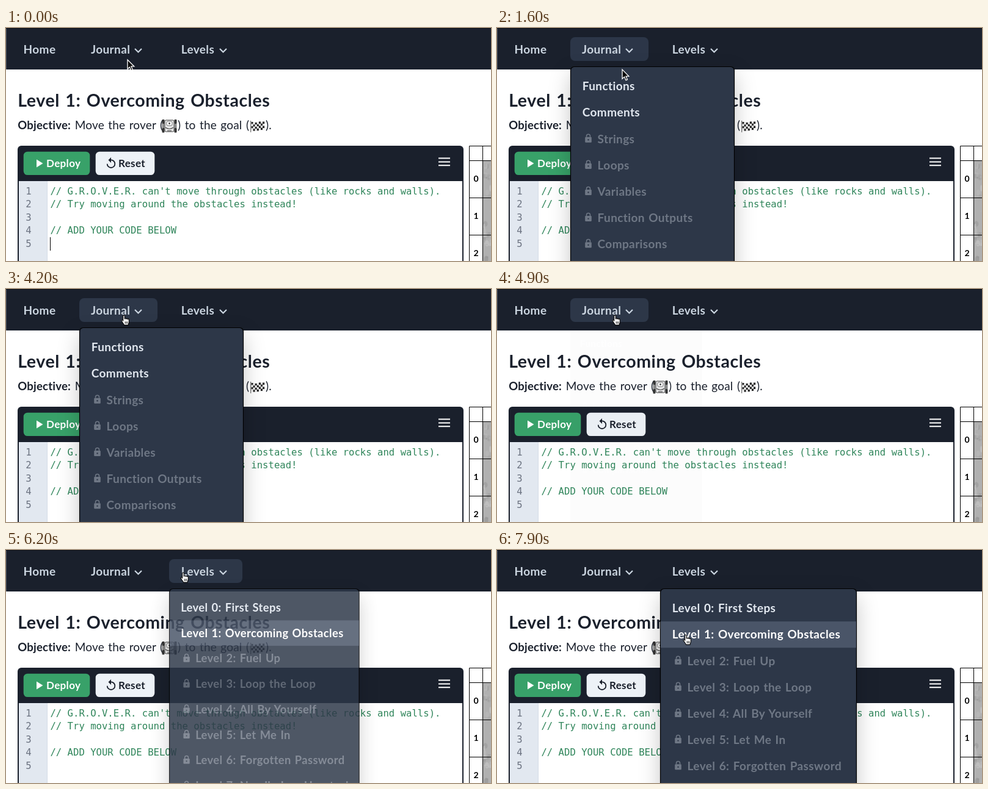
Recreate the animation shown at these times as an HTML page. Size 794x382 px, loop 8 s.

```html
<!DOCTYPE html>
<html lang="en">
<head>
<meta charset="utf-8">
<title>Level menu</title>
<style>
  html, body { margin: 0; width: 100%; height: 100%; overflow: hidden; background: #fff; }
  svg { display: block; width: 794px; height: 382px; }
  text { font-family: Lato, "Open Sans", sans-serif; white-space: pre; }
  .ui { font-size: 19px; font-weight: 700; letter-spacing: .02em; word-spacing: .07em; }
  .title { font-size: 28.5px; }
  .label { font-size: 18.6px; letter-spacing: .01em; }
  .body { font-size: 19px; letter-spacing: .01em; word-spacing: .07em; }
  .btn { font-size: 17px; }
  .code { font: 15.62px "DejaVu Sans Mono", monospace; }
  .axis { font-size: 14px; font-weight: 700; text-anchor: middle; }
  .panel { filter: drop-shadow(0 14px 17px rgba(0,0,0,.22)); }
</style>
</head>
<body>
<svg id="stage" viewBox="0 0 794 382"></svg>
<script>
const LOOP = 8000, INK = '#1a202c', PALE = '#cbd5e0', SLATE = '#2d3748', LIT = '#4a5568';
const TOP = 64, ROW = 43.1, FIRST = 74;

const rect = (x, y, w, h, fill, extra = '') =>
  `<rect x="${x}" y="${y}" width="${w}" height="${h}" fill="${fill}" ${extra}/>`;
const text = (x, y, s, cls, fill = INK) =>
  `<text x="${x}" y="${y}" class="${cls}" fill="${fill}">${s}</text>`;
const line = (d, stroke, width) =>
  `<path d="${d}" fill="none" stroke="${stroke}" stroke-width="${width}"/>`;
const chevron = x => line(`M${x} 34l5.5 5.5 5.5-5.5`, PALE, 2.2);

function seeded(seed) {
  return () => (seed = (seed * 16807) % 2147483647) / 2147483647;
}

function terrain() {
  const rnd = seeded(41);
  let out = rect(781, 218, 13, 164, '#b0b0b0');
  for (let i = 0; i < 34; i++) {
    const shade = Math.round(140 + rnd() * 65);
    out += `<ellipse cx="${781 + rnd() * 13}" cy="${218 + rnd() * 164}" rx="${1 + rnd() * 3}"
      ry="${1 + rnd() * 5}" fill="rgb(${shade},${shade},${shade})" opacity=".5"/>`;
  }
  return `<g clip-path="url(#ground)">${out}</g>`;
}

function rover() {
  let out = '';
  for (const x of [255.5, 275.5]) {
    out += rect(x, 150, 4, 7, '#333', 'rx="1"') + rect(x, 157, 4, 7, '#888') + rect(x, 164, 4, 7.5, '#333', 'rx="1"');
  }
  return out + rect(260, 151, 15, 19, '#e6e6e6', 'rx="2" stroke="#444"') +
    rect(263, 153, 9, 7, '#fff', 'rx="2" stroke="#555" stroke-width=".8"') +
    `<circle cx="267.5" cy="156.5" r="1.4" fill="#444"/>` +
    line('M261 163q6.5 5 13 0M264 168.5h7', '#444', 1.2);
}

function flag() {
  let out = '';
  for (let c = 0; c < 7; c++) for (let r = 0; r < 4; r++) {
    const y = 154 + r * 3.5 + Math.sin(c * .95) * .9;
    out += rect(401.5 + c * 3.1, y, 3.1, 3.5, (c + r) % 2 ? '#eee' : '#222');
  }
  return out + rect(400, 152, 1.3, 19, '#777');
}

function page() {
  const code = [
    "// G.R.O.V.E.R. can't move through obstacles (like rocks and walls).",
    '// Try moving around the obstacles instead!', '', '// ADD YOUR CODE BELOW', ''];
  const lines = code.map((s, i) => {
    const y = 272.5 + i * 21.6;
    return text(32.3, y, i + 1, 'code', '#6b7280') + text(72.4, y, s, 'code', '#2f855a');
  }).join('');
  const axis = [0, 1, 2].map(i => text(769.5, 252 + i * 61, i, 'axis', '#000')).join('');

  return rect(0, 0, 794, 382, '#fff') +
    rect(0, 0, 794, 68, INK) + rect(0, 0, 794, 1, '#0d1016') + rect(0, 1, 1, 67, '#4b515c') +
    rect(120, 15, 128, 39, SLATE, 'rx="8" id="journalBtn"') +
    rect(267, 15, 120, 39, SLATE, 'rx="8" id="levelsBtn"') +
    text(28.6, 41.5, 'Home', 'ui', PALE) +
    text(139, 41.5, 'Journal', 'ui', PALE) + chevron(211) +
    text(286.7, 41.5, 'Levels', 'ui', PALE) + chevron(350) +
    text(19.2, 128.5, 'Level 1: Overcoming Obstacles', 'ui title') +
    text(19.2, 166, 'Objective:', 'ui label') +
    text(112.7, 166, 'Move the rover (', 'body') + rover() +
    text(281, 166, ') to the goal (', 'body') + flag() +
    text(425, 166, ').', 'body') +
    rect(19, 193, 730, 200, INK, 'rx="6"') + rect(21, 251, 726, 131, '#fff') +
    rect(21, 251, 47, 131, '#e2e8f0') + rect(67, 251, 1, 131, '#d5dce6') + lines +
    rect(72, 343, 1, 22, '#000', 'id="caret"') +
    rect(28.7, 202.7, 108.6, 38.4, '#38a169', 'rx="6.5"') +
    '<path d="M50 215.5v13l10.5-6.5z" fill="#fff"/>' + text(66, 228, 'Deploy', 'ui btn', '#fff') +
    rect(146.7, 202.7, 96.6, 38.4, '#edf2f7', 'rx="6.5"') +
    `<path transform="translate(161.2 211) scale(.9)" fill="${INK}" d="M12 5V1L7 6l5 5V7a6 6 0 1 1-6 6H4a8 8 0 1 0 8-8z"/>` +
    text(184, 228, 'Reset', 'ui btn') +
    line('M708 213.5h19M708 219.5h19M708 225.3h19', '#fff', 2) +
    terrain() +
    line('M794 193.5H758.5V382M780.5 193.5V382M758.5 217.5H794M758.5 278.5H794M758.5 339.5H794', '#000', 1) + axis;
}

const lock = (x, y) =>
  `<g transform="translate(${x} ${y})">${rect(-5.3, -3, 10.6, 9, '#e2e8f0', 'rx="1.3"')}` +
  line('M-3-3v-1.6a3 3 0 0 1 6 0v1.6', '#e2e8f0', 1.5) +
  `<circle cy="1.5" r="1.2" fill="${SLATE}"/></g>`;

// Each menu: two open items, the rest locked.
function menu(id, x, w, items) {
  const rows = items.map((s, i) => {
    const mid = 95.6 + i * ROW;
    if (i < 2) {
      return rect(x, FIRST + i * ROW, w, ROW, LIT, `id="${id}${i}"`) +
        text(x + 18.8, mid + 6.7, s, 'ui', id === 'levels' && i ? '#fff' : '#e2e8f0');
    }
    return `<g opacity=".36">${lock(x + 28.5, mid)}${text(x + 43.6, mid + 6.7, s, 'ui', '#e2e8f0')}</g>`;
  }).join('');
  return `<g id="${id}">${rect(x - .5, TOP - .5, w + 1, 520, SLATE, 'rx="6" class="panel" stroke="#000" stroke-width="1.2"')}${rows}</g>`;
}

const arrow = '<path id="arrow" d="M0 0V15.2L3.5 12L6 17.6L8.4 16.5L6 11H10.8Z" fill="#000" stroke="#fff" stroke-width="1.3"/>';
const hand = `<g id="hand" transform="translate(-5.3 -.7)"><path fill="#fff" stroke="#000" stroke-width="1.1" stroke-linejoin="round"
  d="M4 10V2a1.3 1.3 0 0 1 2.6 0V6.8a1.2 1.2 0 0 1 2.4.3a1.2 1.2 0 0 1 2.4.5a1.1 1.1 0 0 1 2.2.6v3.6c0 1.6-1 2.6-1.2 5h-6.6c-.6-2.2-2.8-4-4.2-6.6c-.8-1.5.9-2.3 1.8-1.2z"/>
  ${line('M7.4 11v3.6M9.2 11v3.6M11 11v3.6', '#000', .8)}</g>`;

const stage = document.getElementById('stage');
stage.innerHTML = '<defs><clipPath id="ground"><rect x="781" y="218" width="13" height="164"/></clipPath></defs>' +
  page() +
  menu('journal', 121, 267, ['Functions', 'Comments', 'Strings', 'Loops', 'Variables', 'Function Outputs', 'Comparisons']) +
  menu('levels', 268, 320, ['Level 0: First Steps', 'Level 1: Overcoming Obstacles', 'Level 2: Fuel Up',
    'Level 3: Loop the Loop', 'Level 4: All By Yourself', 'Level 5: Let Me In',
    'Level 6: Forgotten Password', 'Level 7: Needle In a Haystack']) +
  `<g id="cursor">${arrow}${hand}</g>`;

const el = {};
stage.querySelectorAll('[id]').forEach(n => el[n.id] = n);

const path = [
  [0, 199, 52], [300, 197, 43], [1300, 197, 43], [1600, 205, 68], [1900, 212, 97],
  [2200, 212, 97], [2500, 213, 148], [2700, 213, 148], [2800, 213, 146],
  [3100, 213, 146], [3200, 211, 106], [3300, 210, 99], [3600, 210, 99],
  [4150, 193, 43], [4950, 193, 43], [5450, 290, 37], [6600, 290, 37],
  [7000, 300, 92], [7600, 300, 92], [7900, 309, 139], [8000, 309, 139]];

const clamp = v => Math.min(1, Math.max(0, v));
const ramp = (t, start, len) => clamp((t - start) / len);
const easeInOut = p => p * p * (3 - 2 * p);
const easeOut = p => 1 - (1 - p) * (1 - p);
const lit = (t, on, off, len) => Math.min(ramp(t, on, len), 1 - ramp(t, off, len));
const show = (node, v) => node.setAttribute('opacity', v);

function cursorAt(t) {
  const i = path.findIndex(k => k[0] > t);
  const [a, x, y] = path[i - 1], [b, u, v] = path[i];
  const p = (t - a) / (b - a);
  return [x + (u - x) * p, y + (v - y) * p];
}

function pop(node, x, t, open, close) {
  const p = easeInOut(ramp(t, open, 200)) * (1 - easeOut(ramp(t, close, 100)));
  const s = .8 + .2 * p;
  node.setAttribute('transform', `translate(${x} ${TOP}) scale(${s}) translate(${-x} ${-TOP})`);
  node.setAttribute('visibility', p > 0 ? 'visible' : 'hidden');
  show(node, p);
}

function draw(t) {
  pop(el.journal, 121, t, 952, 4810);
  pop(el.levels, 268, t, 6052, LOOP + 1);

  show(el.journalBtn, Math.max(lit(t, 120, 1600, 100), lit(t, 4020, 5080, 100)));
  show(el.levelsBtn, lit(t, 5280, 6700, 100));
  show(el.journal0, Math.max(lit(t, 1720, 2290, 60), lit(t, 3188, 3840, 60)));
  show(el.journal1, lit(t, 2290, 3188, 60));
  show(el.levels0, lit(t, 6860, 7740, 60));
  show(el.caret, t < 500 ? 1 : 0);

  const [x, y] = cursorAt(t);
  const onButton = y < 51 && (x < 248 || x > 267);
  const pointing = onButton || y >= FIRST;
  el.cursor.setAttribute('transform', `translate(${x} ${y})`);
  show(el.hand, pointing ? 1 : 0);
  show(el.arrow, pointing ? 0 : 1);
}

function tick() {
  draw(performance.now() % LOOP);
  requestAnimationFrame(tick);
}
tick();
</script>
</body>
</html>
```
